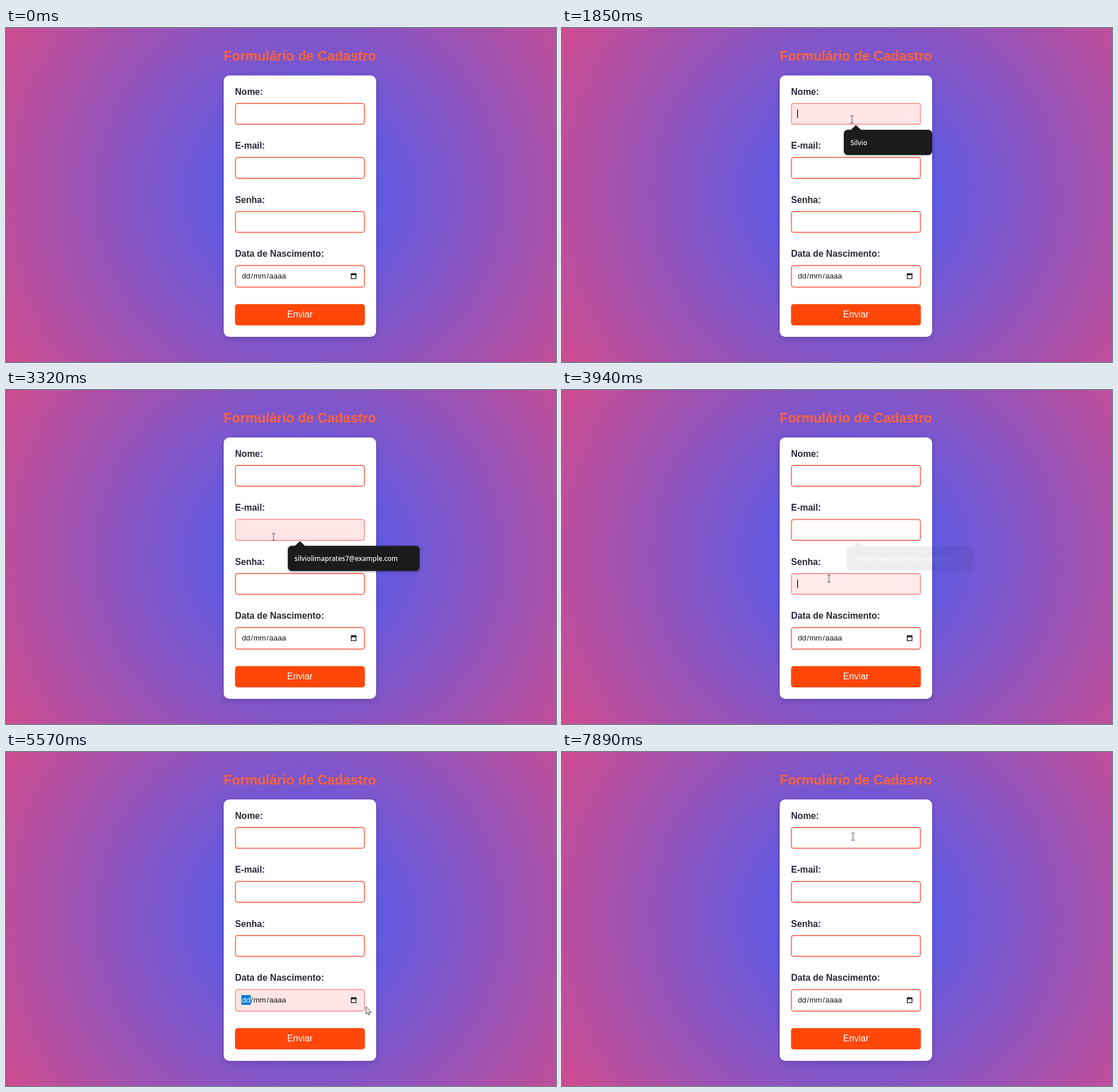
Recreate the animation shown at these times as an HTML page. Size 960 by 584 pixels, loop 8 s.

```html
<!DOCTYPE html>
<html lang="pt-BR">
<head>
<meta charset="utf-8">
<title>Formulário de Cadastro</title>
<style>
  html, body { margin: 0; width: 100%; height: 100%; overflow: hidden; }
  svg { display: block; width: 960px; height: 584px; font-family: "Liberation Sans", Arial, sans-serif; }
  .label { font-weight: bold; font-size: 15.72px; fill: #2e2838; }
  .field { stroke-width: 1.7; }
  .date { font-size: 13.1px; fill: #151018; }
  .tip { font: 600 11.6px "Open Sans", "Noto Sans", sans-serif; fill: #eee; }
  .cal { font-size: 11.8px; fill: #111; }
  .card { filter: drop-shadow(0 3px 4px rgba(0, 0, 0, .16)); }
  .menu { filter: drop-shadow(0 1px 2px rgba(0, 0, 0, .35)); }
  .sheet { filter: drop-shadow(0 6px 11px rgba(0, 0, 0, .32)); }
</style>
</head>
<body>
<svg id="stage" viewBox="0 0 960 584">
  <defs>
    <radialGradient id="sky" gradientUnits="userSpaceOnUse" cx="513" cy="290" r="780">
      <stop offset="0" stop-color="#3f5efb"/>
      <stop offset="1" stop-color="#fc466b"/>
    </radialGradient>
  </defs>
  <rect width="960" height="584" fill="url(#sky)"/>
  <text x="513" y="57.3" text-anchor="middle" font-size="23.58" font-weight="bold" fill="#ff6339">Formulário de Cadastro</text>
  <rect class="card" x="380" y="83" width="266" height="457" rx="9.8" fill="#fff"/>
  <g id="form"></g>
  <g class="date">
    <rect id="pick" x="410.8" y="425" width="16.4" height="17" fill="#0078d7"/>
    <text id="day" x="411.8" y="438">dd</text>
    <text x="427.4" y="438">/</text>
    <text x="431.9" y="438">mm</text>
    <text x="454.9" y="438">/</text>
    <text x="459.6" y="438">aaaa</text>
    <path d="M602.6 430.2h8.3v8.1h-8.3z" fill="none" stroke="#111" stroke-width="1.3"/>
    <path d="M602 429.5h9.6v2.7h-9.6zM603.6 428.2h1.4v2h-1.4zM608.6 428.2h1.4v2h-1.4z" fill="#111"/>
  </g>
  <rect x="399.7" y="482.7" width="226.7" height="37.4" rx="4.9" fill="#ff470a"/>
  <text x="513" y="506.2" text-anchor="middle" font-size="15.72" fill="#fff">Enviar</text>
  <rect id="caret" x="410.6" width="1.4" height="15" fill="#111"/>
  <g id="menus"></g>
  <g id="cal" class="cal"></g>
  <path id="beam" d="M-3 -6.3h2.2l.8.7l.8-.7h2.2M0-5.8v11.6M-3 6.3h2.2l.8-.7l.8.7h2.2" fill="none" stroke="#4c4c52" stroke-width="1"/>
  <path id="arrow" d="M.5.5V13.2L3.4 10.5L5.4 15L7.3 14.1L5.3 9.8H9.4Z" fill="#fff" stroke="#222" stroke-width=".9" stroke-linejoin="round"/>
</svg>
<script>
const LOOP = 8000, PITCH = 94.5, FADE = 300;
const NS = "http://www.w3.org/2000/svg";
const $ = id => document.getElementById(id);

function add(parent, tag, attrs, text) {
  const el = document.createElementNS(NS, tag);
  for (const k in attrs) el.setAttribute(k, attrs[k]);
  if (text) el.textContent = text;
  return parent.appendChild(el);
}
const clamp = v => Math.max(0, Math.min(1, v));
const smooth = v => { v = clamp(v); return v * v * (3 - 2 * v); };
const ease = v => 1 - Math.pow(1 - clamp(v), 2.2);
const mix = (a, b, p) => "rgb(" + a.map((v, i) => Math.round(v + (b[i] - v) * p)) + ")";
const show = (el, on) => el.setAttribute("visibility", on ? "visible" : "hidden");
const move = (el, x, y) => el.setAttribute("transform", `translate(${x.toFixed(2)} ${y.toFixed(2)})`);

// Focus and blur time of each field
const fields = [
  { label: "Nome:", on: 1480, off: 2590 },
  { label: "E-mail:", on: 2590, off: 3750 },
  { label: "Senha:", on: 3750, off: 5290 },
  { label: "Data de Nascimento:", on: 5290, off: 6000 }
];
fields.forEach((f, i) => {
  f.y = 131 + i * PITCH;
  add($("form"), "text", { class: "label", x: 399.7, y: f.y - 14.5 }, f.label);
  f.box = add($("form"), "rect", {
    class: "field", x: 400.5, y: f.y + .8, width: 225.1, height: i == 3 ? 37.9 : 36.6, rx: 4.2
  });
});

// Autofill bubbles
const menus = [
  { text: "Silvio", w: 154 },
  { text: "silviolimaprates7@example.com", w: 230 }
];
menus.forEach((m, i) => {
  const top = 178 + i * PITCH;
  m.cx = 492 + m.w / 2;
  m.cy = top + 22;
  m.g = add($("menus"), "g", { class: "menu" });
  add(m.g, "rect", { x: 492, y: top, width: m.w, height: 44, rx: 6.5, fill: "#1b1b1d" });
  add(m.g, "path", { d: `M504 ${top + .5}L513 ${top - 8.3}L522 ${top + .5}Z`, fill: "#1b1b1d" });
  add(m.g, "text", { class: "tip", x: 503.5, y: top + 26.6 }, m.text);
});

function buildCalendar(g) {
  const cell = (x, y, text, attrs) => add(g, "text", { x, y: y + 4.2, "text-anchor": "middle", ...attrs }, text);
  add(g, "rect", { class: "sheet", x: 401, y: 139.5, width: 213, height: 275, rx: 7, fill: "#fff", stroke: "#8c8c8c", "stroke-width": .9 });
  add(g, "text", { x: 411.2, y: 165.2, "font-weight": "bold" }, "outubro de 2024");
  add(g, "path", { d: "M505.6 159h7.6l-3.8 4.2z" });
  add(g, "path", {
    d: "M558.7 170V154.6M551.7 161.6l7-7l7 7M590.2 154v15.4M583.2 162.4l7 7l7-7",
    fill: "none", stroke: "#111", "stroke-width": 1.1
  });
  const colX = c => 424.8 + c * 27.55;
  [..."DSTQQSS"].forEach((d, c) => cell(colX(c), 197.3, d));
  for (let n = 0; n < 42; n++) {
    const x = colX(n % 7), y = 225.8 + Math.floor(n / 7) * 27.55, d = n - 1;
    if (d == 24) {
      add(g, "rect", { x: x - 12.8, y: y - 13.8, width: 25.7, height: 25.8, rx: 1, fill: "#0a78ff", stroke: "#111", "stroke-width": 1.8 });
      cell(x, y, d, { fill: "#fff", "font-weight": "bold" });
    } else if (d < 1) cell(x, y, d + 30, { fill: "#767676" });
    else if (d > 31) cell(x, y, d - 31, { fill: "#767676" });
    else cell(x, y, d);
  }
  add(g, "text", { x: 421.4, y: 398.3, fill: "#0075d0" }, "Limpar");
  add(g, "text", { x: 569, y: 398.3, fill: "#0075d0" }, "Hoje");
}
buildCalendar($("cal"));

// Pointer path: time, x, y
const path = [
  [260, 904, 503], [480, 765, 330], [740, 570, 95], [880, 525, 76], [1020, 497, 115],
  [1090, 485, 127], [1170, 488, 144], [1300, 506, 160], [1980, 506, 160],
  [2280, 488, 212], [2520, 467, 257], [3370, 467, 257], [3680, 466, 330],
  [3970, 466, 330], [4080, 466, 354], [4150, 466, 354], [4500, 535, 402],
  [4910, 606.5, 436], [4990, 606.5, 436], [5100, 573, 441], [5300, 573, 441],
  [5520, 628, 445], [5600, 628, 445], [5850, 606.5, 436], [7030, 606.5, 436],
  [7210, 682, 427], [7310, 682, 427], [7370, 684, 426], [7450, 684, 426], [7890, 508, 148]
];
function pointer(t) {
  const i = path.findIndex(p => p[0] > t);
  if (i < 0) return path[path.length - 1].slice(1);
  const a = path[i - 1], b = path[i], p = (t - a[0]) / (b[0] - a[0]);
  return [a[1] + (b[1] - a[1]) * p, a[2] + (b[2] - a[2]) * p];
}

function draw(t) {
  let caretY = null;
  fields.forEach((f, i) => {
    const p = t < f.off ? ease((t - f.on) / FADE) : 1 - ease((t - f.off) / FADE);
    f.box.setAttribute("fill", mix([255, 255, 255], [255, 230, 230], p));
    f.box.setAttribute("stroke", mix([250, 101, 80], [250, 146, 146], p));
    if (i < 3 && t >= f.on && t < f.off && (t - f.on) % 1000 < 500) caretY = f.y + 11.5;
  });
  show($("caret"), caretY !== null);
  if (caretY !== null) $("caret").setAttribute("y", caretY);

  menus.forEach((m, i) => {
    const open = fields[i].on + 10, out = clamp((t - fields[i].off) / 205);
    const alpha = clamp((t - open) / (i ? 50 : 180)) * (1 - out);
    const s = 1 - .047 * out;
    show(m.g, alpha > 0);
    m.g.setAttribute("opacity", alpha);
    m.g.setAttribute("transform", `translate(${m.cx * (1 - s)} ${m.cy * (1 - s)}) scale(${s})`);
  });

  const picked = t >= fields[3].on && t < fields[3].off;
  show($("pick"), picked);
  $("day").setAttribute("fill", picked ? "#fff" : "#151018");

  const cal = smooth((t - 5990) / 120) * (1 - smooth((t - 7390) / 90));
  show($("cal"), cal > 0);
  $("cal").setAttribute("opacity", cal);

  const seen = t >= path[0][0];
  const [x, y] = seen ? pointer(t) : [0, 0];
  const text = x > 400 && x < 626 && cal < .5 && fields.some((f, i) => i < 3 && y > f.y && y < f.y + 38);
  show($("beam"), seen && text);
  show($("arrow"), seen && !text);
  move($(text ? "beam" : "arrow"), x, y);
}

const start = performance.now();
function tick() {
  draw((performance.now() - start) % LOOP);
  requestAnimationFrame(tick);
}
tick();
</script>
</body>
</html>
```
